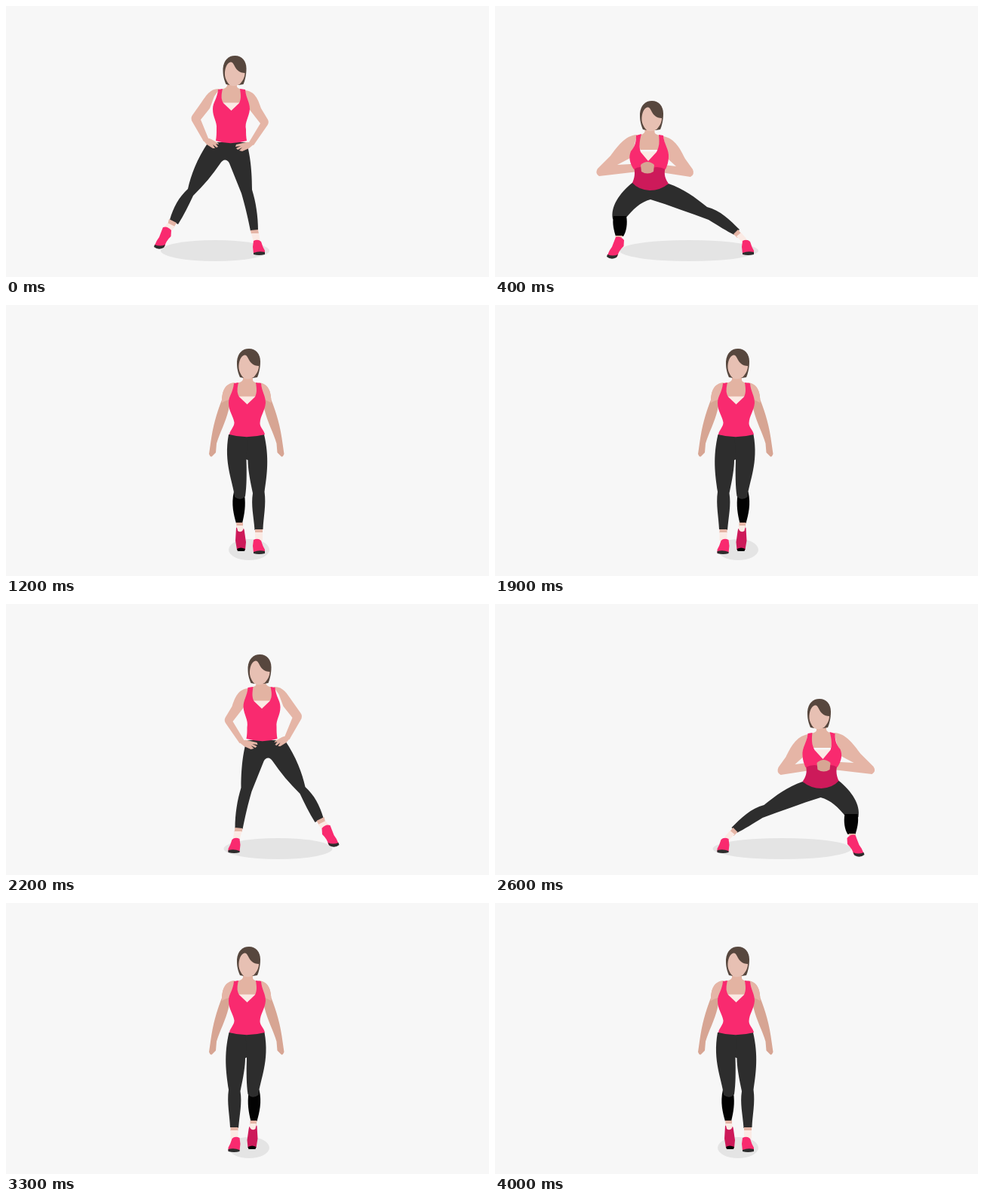
Write an HTML page that moves like this. It is 640x360 px and loops after 4300 ms.

```html
<!DOCTYPE html>
<html lang="en">
<head>
<meta charset="utf-8">
<title>Side lunge</title>
<style>
  html, body { margin: 0; width: 100%; height: 100%; overflow: hidden; background: #f7f7f7; }
  svg { display: block; width: 100vw; height: 100vh; }
</style>
</head>
<body>
<svg id="stage" viewBox="0 0 640 360"></svg>
<script>
const color = {
  pink: '#f92a6f', deep: '#cd1a5a', pants: '#2d2d2d', black: '#030303', sock: '#fbeae4',
  skin: '#e5b5a6', shade: '#d7a593', chest: '#e3b3a2', face: '#e7c0b3', hair: '#57473e', shadow: '#e4e4e4'
};
const LOOP = 4300;
const AXIS_SUM = 637.5;

const shape = (fill, d) => `<path fill="${color[fill]}" d="${d}"/>`;
const move = (x, y, art) => `<g transform="translate(${x} ${y})">${art}</g>`;
const mirror = art => `<g transform="translate(${AXIS_SUM} 0) scale(-1 1)">${art}</g>`;

const head =
  shape('hair', 'M310 96C306 87 306 81 306 75C307 64 313 58 322 58C331 58 337 65 337 75C337 84 335 91 333 96L327 97H315Z') +
  shape('face', 'M308.500 84C308 75 311 68 316 66.500C320 66 321 73 325 77C328 80 332 81 335 81C335 87 332 92 328 96Q321 100 315 97C312 94 309 89 308.500 84Z');

const neck = shape('chest', 'M314 93H327V100Q328 103 335 104L332 123H308L304 104Q313 103 314 99Z');

// waist and hem are half widths around the centre of the vest
function torso(waist, hem) {
  const mid = 319.5;
  return neck +
    shape('sock', 'M307 121.500H332L320 134Z') +
    shape('pink', `M302 104L308 103C306 111 306 117 309 122L319.500 132L330 122C333 116 332 110 331 103L338 104
      C339 116 344 120 344 130C343 141 337 147 ${mid + waist} 157C${mid + waist} 163 ${mid + hem - 1} 166 ${mid + hem} 172
      Q318 178.500 ${mid - hem} 172C${mid - hem + 1} 166 ${mid - waist} 162 ${mid - waist} 156C301 147 295 141 295 130C295 121 301 116 302 104Z`);
}
const uprightTorso = torso(17, 23.5);

const bentTorso =
  move(-107.5, 56, neck) +
  shape('sock', 'M199 181.500H224L212 196Z') +
  shape('deep', 'M192 202H234C231 212 234 218 238 224Q227 233 213 233Q198 232 190 223C193 216 194 210 192 202Z') +
  shape('pink', 'M195 160L202 158C199 168 199 176 201 182L211 194L222 182C226 175 226 167 225 159L231 160C232 172 239 179 238 189C238 195 236 200 234 205Q222 199 211 205Q200 199 192 205C186 196 185 188 188 181C194 174 195 168 195 160Z');

const flatShoe =
  shape('pink', 'M328 312Q334 309 338 313Q340 320 343 325V329H328L327 320Z') +
  shape('pants', 'M328 328Q335 325 343 327V330Q335 332 328 330Z');
const flatFoot =
  shape('skin', 'M324 298L334 297L335 303H325Z') +
  shape('sock', 'M325 302H335L337 313H328Z') + flatShoe;
const sideShoe =
  shape('pink', 'M208 294Q214 292 219 298L218.500 306Q212 312 210 320L203 322L197 318Q199 312 203 307Z') +
  shape('pants', 'M197 317Q204 320 211 317L209 321Q202 325 196 320Z');
const liftedShoe =
  shape('skin', 'M305 289H314V296H306Z') +
  shape('sock', 'M306 293H314L315 301H306Z') +
  shape('deep', 'M305 296Q306 294 307 300Q311 303 314 299Q315 294 316 301L318 315L317 325Q311 328 306 325L304 313Z') +
  shape('black', 'M306 324Q311 321 317 324L316 327H307Z');
const plantedFoot =
  shape('skin', 'M316 303L322 297L327 303L321 308Z') +
  shape('sock', 'M320 306L326 301L333 309L329 315Z') + flatShoe;

const straightLeg =
  shape('pants', 'M318 173L342 172C349 202 346 225 342.500 248C345 265 341 283 340.500 298L329.500 299C328 280 324.500 266 327 250C323 231 320.500 217 320.500 206L318 205Z') +
  shape('skin', 'M330 298H340V303H330Z') +
  shape('sock', 'M330 302H340V313H330Z') + flatShoe;

const hangingArm =
  shape('shade', 'M302 104C290 105 287 114 286 126C279 144 274 161 271 184L269 198Q271 203 273 201L278 196L279 184C283 170 291 156 295 139L300 116Z') +
  shape('skin', 'M303 103C290 104 286 114 286 130Q293 126 296 126L301 115Z');
const hangingArms = hangingArm + mirror(hangingArm);

const hipArms =
  shape('skin', 'M283 110C271 109 265 119 259 128L247 145Q244 149 247 154L262 180L269 178L258 151L270 136L276 120Z') +
  shape('skin', 'M316 112C330 113 334 124 338 136L347 151Q349 155 346 159L328 185L322 181L337 156L323 138Z');
const hipHands =
  shape('skin', 'M261 178Q266 174 272 177L281 182L282 184L278 183L281 187L279 188L274 184L277 189L274 189L266 184Z') +
  shape('skin', 'M328 184Q324 180 318 181L305 184L304 187L311 186L305 189L307 191L313 188L309 192L313 193L322 189Z');

const swingArms =
  shape('skin', 'M196 158C181 159 173 174 165 183L155 196Q151 202 154 207L162 219L173 212L169 205L188 190L195 172Z') +
  shape('skin', 'M231 160C246 164 249 178 254 188L264 206Q267 212 261 218L251 225L245 217L250 209L236 192Z');
const swingHands =
  shape('shade', 'M159 214Q162 208 171 208L182 205L184 210L177 213L181 216L172 219Q163 222 159 214Z') +
  shape('shade', 'M255 223Q253 214 244 213L234 210L233 216L240 219L236 222Q248 229 255 223Z');

const claspArms =
  shape('skin', 'M188 171C172 172 162 187 153 199L136 216Q132 222 138 226L198 219L197 209L162 211L181 201Z') +
  shape('skin', 'M223 173C239 176 246 191 252 203L262 217Q265 224 259 227L207 219L207 209L240 213L229 203Z');
const claspHands = shape('shade', 'M193 211Q202 203 211 211L210 220Q202 225 194 220Z');

const bentCalf =
  shape('black', 'M157 279C155 290 158 299 160 306H170C174 300 176 289 174 279Z') +
  shape('skin', 'M160 305H169L167 310H159Z') +
  move(-48, 13, shape('sock', 'M207 294L216 295L215 299H207Z') + sideShoe);

const poses = {
  stride: {
    shadow: [277, 72],
    legs: shape('pants', 'M268 181H319C322 194 326 211 326 244C331 260 334 279 334 298L324 299C321 284 317 266 312 249L296 209Q294 204.500 290 204.500Q287 204.500 284 209C274 224 262 238 248 252C242 265 236 277 228 290L217 284C222 267 229 254 241 243C245 225 253 203 268 181Z') +
      shape('skin', 'M216 283L226 288L222 295L214 291Z') + shape('sock', 'M214 288L224 293L218 300L209 295Z') + sideShoe + flatFoot,
    arms: hipArms, torso: move(-21, 7, torso(19.5, 20.5)), hands: hipHands,
    heads: [[-18.5, 8], [14.5, 9]]
  },
  lunge: {
    shadow: [257, 92],
    legs: shape('pants', 'M191 222Q213 235 238 224C255 232 267 248 282 263C299 267 312 284 324 297L317 304C307 298 296 291 284 280C260 268 237 255 214 245C199 251 185 266 174 281Q165 288 157 284C155 268 170 242 191 222Z') +
      bentCalf + plantedFoot,
    arms: swingArms, torso: bentTorso, hands: swingHands,
    heads: [[-106, 56], [100, 56]]
  },
  deep: {
    shadow: [257, 92],
    legs: shape('pants', 'M183 234Q205 247 230 236C250 243 265 254 281 267C298 271 312 285 324 297L317 304C307 299 296 292 283 284C258 275 232 265 206 257C193 260 182 271 173 282Q163 288 156 283C153 267 164 249 183 234Z') +
      bentCalf + plantedFoot,
    arms: claspArms, torso: move(-8, 12, bentTorso), hands: claspHands,
    heads: [[-114, 68], [108, 68]]
  },
  step: {
    shadow: [322, 27], legsOnly: true,
    legs: straightLeg +
      shape('black', 'M302 248C298 265 302 279 305 290H313C316 278 318 266 316 252Z') +
      shape('pants', 'M295 172H320L318.500 206C319 224 319 240 317 254Q311 261 303 255C301 235 288 210 295 172Z') + liftedShoe,
    arms: hangingArms, torso: uprightTorso, hands: '',
    heads: [[0, 0], [0, 0]]
  },
  jump: {
    shadow: [322, 22],
    legs: move(0, -36, straightLeg + mirror(straightLeg)),
    arms: move(3, -36, hangingArms), torso: move(0, -36, uprightTorso), hands: '',
    heads: [[0, -36], [0, -36]]
  }
};

function drawFigure(pose, side) {
  const flip = art => side ? mirror(art) : art;
  const flipTop = art => pose.legsOnly ? art : flip(art);
  const [cx, rx] = pose.shadow;
  const shadow = `<ellipse cx="${cx}" cy="325" rx="${rx}" ry="14" fill="${color.shadow}"/>`;
  return flipTop(shadow) + flip(pose.legs) + flipTop(pose.arms + pose.torso + pose.hands) +
    move(...pose.heads[side], head);
}

// start time, pose, side (0 left, 1 right)
const steps = [
  [0, 'stride', 0], [200, 'lunge', 0], [400, 'deep', 0], [800, 'lunge', 0], [1000, 'stride', 0],
  [1200, 'step', 0], [1500, 'jump', 0], [1900, 'step', 1],
  [2200, 'stride', 1], [2400, 'lunge', 1], [2600, 'deep', 1], [2900, 'lunge', 1], [3100, 'stride', 1],
  [3300, 'step', 1], [3600, 'jump', 0], [4000, 'step', 0]
];

const stage = document.getElementById('stage');
const keyOf = ([, name, side]) => name + side;
for (const key of new Set(steps.map(keyOf))) {
  const [, name, side] = steps.find(step => keyOf(step) === key);
  const group = document.createElementNS(stage.namespaceURI, 'g');
  group.innerHTML = drawFigure(poses[name], side);
  stage.append(group);

  const frames = steps.map(step => ({
    offset: step[0] / LOOP, opacity: keyOf(step) === key ? 1 : 0, easing: 'step-end'
  }));
  frames.push({ offset: 1, opacity: frames.at(-1).opacity });
  group.animate(frames, { duration: LOOP, iterations: Infinity });
}
</script>
</body>
</html>
```
